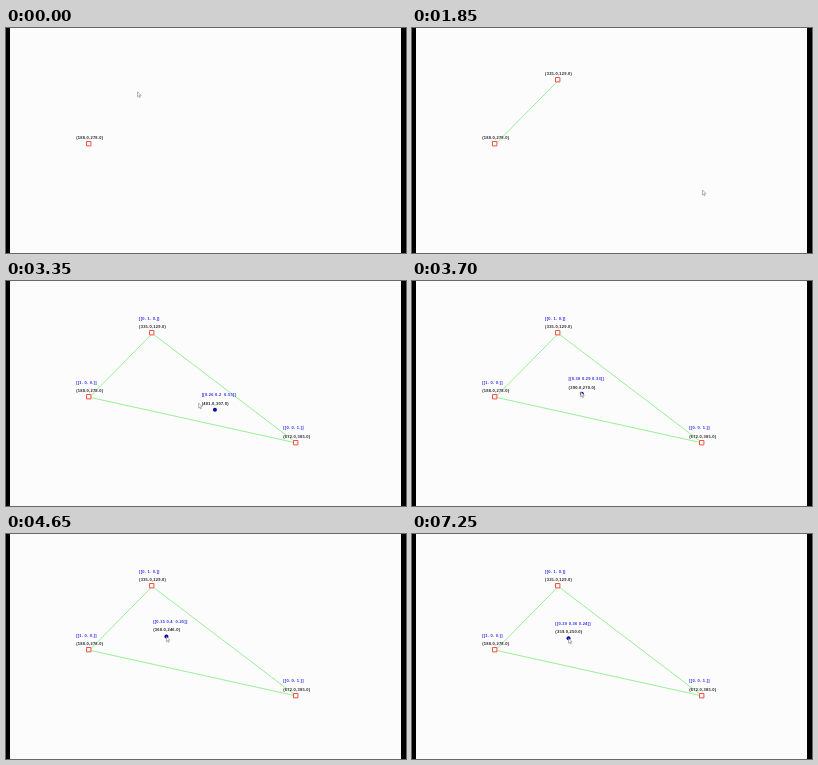
An HTML page with a canvas that plays this animation: 400x225 px, repeating every 8 s.

```html
<!DOCTYPE html>
<html lang="en">
<head>
<meta charset="utf-8">
<title>Barycentric coordinates</title>
<style>
  html, body { margin: 0; width: 100%; height: 100%; overflow: hidden; background: #fcfcfc; }
  canvas { display: block; width: 100%; height: 100%; }
</style>
</head>
<body>
<canvas id="stage" width="400" height="225"></canvas>
<script>
const ctx = document.getElementById('stage').getContext('2d');
const LOOP = 8000, STEP = 50, SCALE = 2.338;
const CLOSED = 2300, PROBE = 2850, LAG = 116;
const PAPER = '#fcfcfc', GREEN = '#8fee8d';

const vertices = [
  { x: 188, y: 278, from: 0 },
  { x: 335, y: 129, from: 1150 },
  { x: 672, y: 385, from: 2200 }
];
const [A, B, C] = vertices;

const home = { x: 300.7, y: 155.5 };
const moves = [
  { from: 0, to: 400, x: B.x, y: B.y },
  { from: 1100, to: 1850, x: C.x, y: C.y },
  { from: 2820, to: 3570, x: 390, y: 270 },
  { from: 3650, to: 4030, x: 377, y: 247 },
  { from: 4480, to: 4530, x: 368, y: 246 },
  { from: 6000, to: 6230, x: 359, y: 250 }
];

const clamp = u => Math.min(1, Math.max(0, u));
const ease = u => u * (1.5 - 0.5 * u);

function pointerAt(t) {
  return moves.reduce((p, m) => {
    const k = ease(clamp((t - m.from) / (m.to - m.from)));
    return { x: p.x + (m.x - p.x) * k, y: p.y + (m.y - p.y) * k };
  }, home);
}

const toScreen = p => ({ x: 3 + p.x / SCALE, y: p.y / SCALE - 2.7 });

function barycentric(p) {
  const cross = (a, b, c) => (b.x - a.x) * (c.y - a.y) - (c.x - a.x) * (b.y - a.y);
  const area = cross(A, B, C);
  return [cross(p, B, C) / area, cross(A, p, C) / area, cross(A, B, p) / area];
}

// Trailing zeros become padding, as in a printed array.
function formatWeights(weights) {
  const whole = weights.every(w => Math.abs(w - Math.round(w)) < 0.005);
  const parts = weights.map(w => {
    const value = Math.abs(w);
    return whole ? value.toFixed(0) + '.' : value.toFixed(2).replace(/0$/, ' ');
  });
  return `[[${parts.join(' ')}]]`;
}

function label(text, x, y, color) {
  ctx.font = 'bold 4px "Liberation Sans", Arial, sans-serif';
  ctx.letterSpacing = '0.25px';
  ctx.fillStyle = color;
  ctx.fillText(text, x - 13.2, y);
}

function captions(p, withWeights) {
  const { x, y } = toScreen(p);
  label(`(${p.x.toFixed(0)}.0,${p.y.toFixed(0)}.0)`, x, y - 5.2, '#222');
  if (withWeights) label(formatWeights(barycentric(p)), x, y - 13.6, '#2c2ce8');
}

function drawEdge(p, q) {
  const a = toScreen(p), b = toScreen(q);
  ctx.strokeStyle = GREEN;
  ctx.lineWidth = 0.9;
  ctx.beginPath();
  ctx.moveTo(a.x, a.y);
  ctx.lineTo(b.x, b.y);
  ctx.stroke();
}

function drawVertex(v, t) {
  const { x, y } = toScreen(v);
  ctx.fillStyle = PAPER;
  ctx.strokeStyle = '#f4523f';
  ctx.lineWidth = 1;
  ctx.beginPath();
  ctx.rect(Math.round(x) - 2.5, Math.round(y) - 2.5, 4.4, 4.4);
  ctx.fill();
  ctx.stroke();
  captions(v, t >= CLOSED);
}

function drawProbe(p) {
  const { x, y } = toScreen(p);
  captions(p, true);
  ctx.fillStyle = '#0808b4';
  ctx.beginPath();
  ctx.arc(x, y, 2, 0, Math.PI * 2);
  ctx.fill();
}

function drawCursor(p) {
  const { x, y } = toScreen(p);
  ctx.save();
  ctx.translate(x, y);
  ctx.fillStyle = '#fff';
  ctx.strokeStyle = '#777';
  ctx.lineWidth = 0.55;
  const arrow = new Path2D('M0 0V5L1.1 4 1.9 5.8 2.7 5.4 1.9 3.7 3.5 3.6Z');
  ctx.fill(arrow);
  ctx.stroke(arrow);
  ctx.restore();
}

function draw(t) {
  ctx.fillStyle = '#000';
  ctx.fillRect(0, 0, 400, 225);
  ctx.fillStyle = PAPER;
  ctx.fillRect(4, 0, 391, 225);

  if (t >= B.from) drawEdge(A, B);
  if (t >= C.from) drawEdge(B, C);
  if (t >= CLOSED) drawEdge(C, A);
  vertices.filter(v => t >= v.from).forEach(v => drawVertex(v, t));

  if (t >= PROBE) drawProbe(pointerAt(t - LAG));
  drawCursor(pointerAt(t));
}

const start = performance.now();
function tick() {
  const t = (performance.now() - start) % LOOP;
  draw(Math.floor(t / STEP) * STEP);
  requestAnimationFrame(tick);
}
tick();
</script>
</body>
</html>
```
